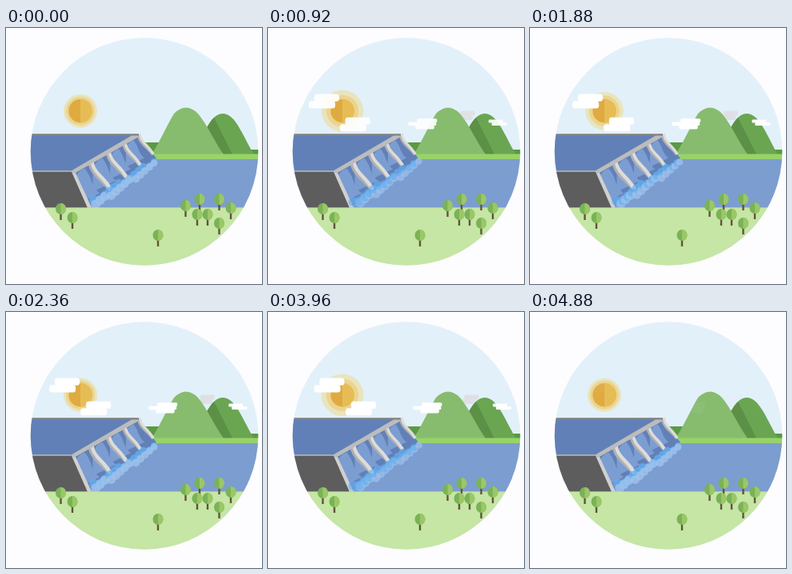
These frames come from a looping animation (320x320 px, 4920 ms). An HTML page:

```html
<!DOCTYPE html>
<html lang="en">
<head>
<meta charset="utf-8">
<title>Dam</title>
<style>
html, body { margin: 0; width: 100%; height: 100%; overflow: hidden; background: #fdfcfe; }
svg { display: block; width: 100vw; height: 100vh; }
</style>
</head>
<body>
<svg viewBox="0 0 320 320">
  <defs>
    <clipPath id="disc"><circle cx="173" cy="154.5" r="142.3"/></clipPath>
    <g id="tree">
      <rect x="-1.2" y="3" width="2.4" height="11" fill="#655140"/>
      <ellipse rx="6.5" ry="7" fill="#7ab257"/>
      <path d="M0-7A6.5 7 0 0 1 0 7Z" fill="#9bc767"/>
    </g>
    <g id="arch">
      <path d="M3 38V12Q5-1 15-4Q21 4 23 12Q28 22 32 24Z" fill="#7c9dd1"/>
    </g>
    <g id="pier">
      <path d="M-3 2L4-2C5 13 16 15 28 34L24 37C15 23 2 19-3 2Z" fill="#dcdcdb"/>
      <path d="M0 0C2 16 13 18 24 37L22 36C12 23 0 18-3 2Z" fill="#b0b0af"/>
    </g>
  </defs>
  <g clip-path="url(#disc)">
    <rect width="320" height="320" fill="#e2f0fa"/>
    <g transform="translate(93 103.7)">
      <circle id="halo" fill="#f0cc50" opacity=".36"/>
      <circle id="ring" fill="#f0bd50" opacity=".42"/>
      <circle r="14.7" fill="#dfab40"/>
      <path d="M0-14.7A14.7 14.7 0 0 1 0 14.7Z" fill="#e6bd55"/>
    </g>
    <g id="backClouds"></g>

    <path d="M160 143H200V158H160ZM298 152H316V159H298Z" fill="#599a42"/>
    <path d="M234 158C244 139 252 119 261 111Q271 103 281 111C291 119 299 140 310 158Z" fill="#6aa552"/>
    <path d="M234 158C244 139 252 119 260 112L283 158Z" fill="#5b9046"/>
    <path d="M182 158C193 141 202 120 210 107Q225 92 240 107C251 120 260 141 272 158Z" fill="#87bc6f"/>
    <rect x="170" y="157.5" width="150" height="7" fill="#98d369"/>
    <rect x="80" y="164" width="240" height="61" fill="#7c9dcf"/>

    <path d="M28 134H160L84 180H28Z" fill="#6180b8"/>
    <path d="M82 179L165 133L188 163L104 224.5Z" fill="#6180b8"/>
    <g id="face"></g>
    <path d="M80 179H86L107 224.5H101Z" fill="#d0d0d0"/>
    <path d="M28 132.3H166V135H28Z" fill="#818182"/>
    <path d="M28 178.3H82L157 134.5H166L165 136.5L85 182L82 180H28Z" fill="#bcbcbc"/>
    <path d="M28 179.8H82L102 225H28Z" fill="#5d5d5e"/>
    <g id="spray"></g>

    <rect y="224.4" width="320" height="80" fill="#c5e6a4"/>
    <g id="trees"></g>
    <g id="clouds"></g>
  </g>
</svg>
<script>
const LOOP = 4920, STEP = 40;
const NS = "http://www.w3.org/2000/svg";
const $ = id => document.getElementById(id);

function add(parent, tag, attrs) {
  const el = document.createElementNS(NS, tag);
  for (const key in attrs) el.setAttribute(key, attrs[key]);
  return parent.appendChild(el);
}

// four bays along the crest, shrinking with distance
function place(href, i) {
  const u = .29 * i - .01 * i * i;
  const scale = 1.1 - .1 * i;
  const at = `translate(${82 + 84 * u} ${180 - 47 * u}) scale(${scale})`;
  add($("face"), "use", { href, transform: at });
}
for (let i = 0; i < 4; i++) place("#arch", i);
for (let i = 1; i < 5; i++) place("#pier", i);

const tree = (x, y) => add($("trees"), "use", { href: "#tree", x, y });
function pair(x, y) {
  tree(x, y);
  tree(x + 14.5, y + 11);
}
tree(242, 214);
pair(266.5, 214);
pair(224.5, 222);
pair(252, 233);
pair(68.5, 226);
tree(190, 259);

// rows hold the left and right end of each bar as a share of the width
function cloud(id, x, y, w, h, speed, rows, fill = "#fff") {
  const el = add($(id), "g", { fill });
  const bar = h / rows.length;
  rows.forEach(([from, to], i) => add(el, "rect", {
    x: from * w, y: i * bar, width: (to - from) * w, height: bar + .6, rx: bar * .4
  }));
  return { el, x, y, speed };
}

const left = [[.18, 1], [0, .87]];
const right = [[0, .78], [.17, 1]];
const wide = [[.3, 1], [0, .97], [.25, .9]];
const clouds = [
  cloud("clouds", 49, 82.5, 38, 17.5, 2.15, left),
  cloud("clouds", 87.5, 111.7, 38, 17, 2.4, left),
  cloud("clouds", 173.5, 113.3, 36, 12.5, 2, wide),
  cloud("clouds", 274, 114.5, 23, 7, 1.8, right),
  cloud("backClouds", 235, 103.5, 22, 11, 1.6, left, "#dfe0e5")
];

// spray along the foot of the dam: two rows swaying against each other
const COUNT = 26;
const drops = Array.from({ length: COUNT }, (_, i) => {
  const k = i / (COUNT - 1);
  const way = i % 2 ? 1 : -1;
  const off = way * 2 + (i * 7) % 5 - 2;
  return {
    el: add($("spray"), "circle", { fill: way > 0 ? "#a3c4ec" : "#66b1f3" }),
    x: 110 + 77 * k + off * .5,
    y: 219.5 - 52 * k + off * .8,
    r: 6 - 1.6 * k,
    way
  };
});

function draw(time) {
  const t = Math.floor((time % LOOP) / STEP) * STEP;
  const pulse = (1 - Math.cos(4 * Math.PI * t / LOOP)) / 2;
  $("halo").setAttribute("r", 21 + 6 * pulse);
  $("ring").setAttribute("r", 18 + 2.4 * pulse);

  const fade = Math.max(0, Math.min(1, t / 1000, (LOOP - t) / 920));
  for (const c of clouds) {
    c.el.setAttribute("transform", `translate(${c.x + c.speed * t / 1000} ${c.y})`);
    c.el.setAttribute("opacity", fade);
  }

  for (const d of drops) {
    const shift = d.way * (pulse - .5) * 4;
    d.el.setAttribute("cx", d.x + shift);
    d.el.setAttribute("cy", d.y - shift * .65);
    d.el.setAttribute("r", d.r);
    d.el.setAttribute("opacity", .75 - .12 * pulse);
  }
}

const start = performance.now();
function tick() {
  draw(performance.now() - start);
  requestAnimationFrame(tick);
}
tick();
</script>
</body>
</html>
```
